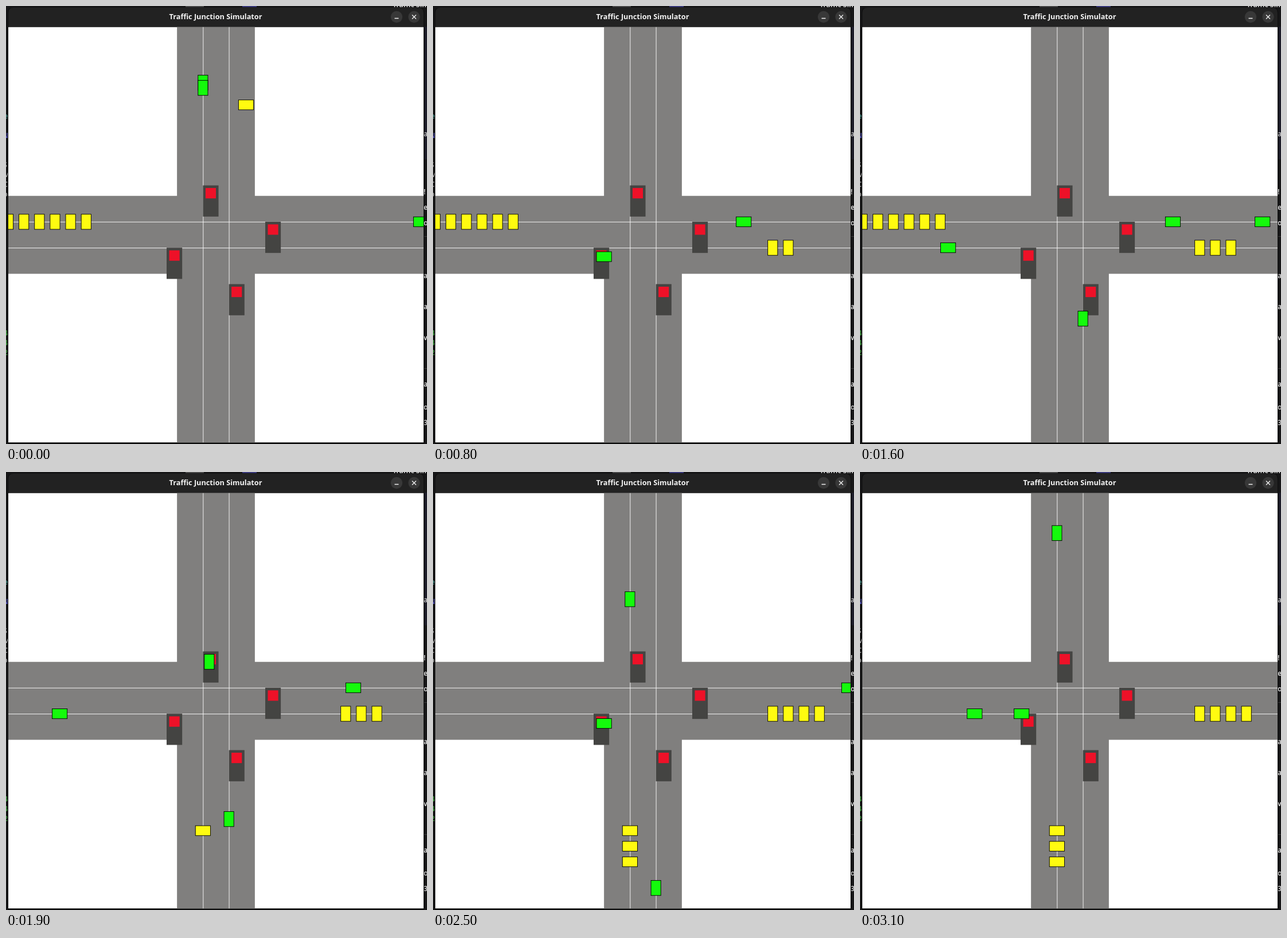
An HTML page that plays this animation: 734 px wide and 763 px high, repeating every 3.2 s.

```html
<!DOCTYPE html>
<html lang="en">
<head>
<meta charset="utf-8">
<title>Traffic Junction Simulator</title>
<style>
  html, body { margin: 0; width: 100%; height: 100%; overflow: hidden; background: #161616; }
  svg { display: block; width: 734px; height: 763px; }
  text { font-family: "Open Sans", "Noto Sans", sans-serif; }
</style>
</head>
<body>
<svg viewBox="0 0 734 763" width="734" height="763">
  <defs><clipPath id="view"><rect width="800" height="800"/></clipPath></defs>
  <rect width="734" height="763" fill="#161617"/>
  <rect x="729.500" y="36" width="5" height="231" fill="#1c1c28"/>
  <path d="M313 1h32" stroke="#4a4a4a" stroke-width="2"/>
  <path d="M412 1h25" stroke="#39397a" stroke-width="2"/>
  <path d="M729 401.500h5M729 631.500h5" stroke="#3c3c3c"/>
  <text x="674" y="2" font-size="12.500" font-weight="600" fill="#eee">Traffic Sim</text>
  <g id="edges"></g>
  <path d="M3 763V12Q3 3 12 3H720Q729 3 729 12V763Z" fill="#0d0d0d"/>
  <path d="M4 36V12Q4 3 13 3H719Q728 3 728 12V36Z" fill="#222"/>
  <text x="365.500" y="23.300" font-size="12.700" font-weight="700" fill="#f4f4f4" text-anchor="middle">Traffic Junction Simulator</text>
  <g fill="#383838"><circle cx="681" cy="19" r="10.200"/><circle cx="711.500" cy="19" r="10.200"/></g>
  <path d="M677.500 21.500h7M708 15.500l7 7m0-7l-7 7" stroke="#f0f0f0" stroke-width="1.300" fill="none"/>
  <g transform="translate(4 36.500) scale(.905)" clip-path="url(#view)">
    <rect width="800" height="800" fill="#fff"/>
    <path d="M325 0H475V800H325ZM0 325H800V475H0Z" fill="#807f7e"/>
    <path d="M375.500 0V800M425.500 0V800M0 375.500H800M0 425.500H800" stroke="#fff"/>
    <g id="lights"></g>
    <g id="cars" stroke="#000"></g>
  </g>
</svg>
<script>
const LOOP = 3200, STEP = 100;
const SPEED = 0.221;            // scene units per ms
const LONG = 30, SHORT = 20;    // car sides
const YELLOW = '#fffb10', GREEN = '#14fa0c', RED = '#ee1128';
const get = id => document.getElementById(id);

const rect = (x, y, w, h, fill) =>
  `<rect x="${x}" y="${y}" width="${w}" height="${h}" fill="${fill}"/>`;
const car = (x, y, upright, fill) => {
  const [w, h] = upright ? [SHORT, LONG] : [LONG, SHORT];
  return rect(x + 0.5, y + 0.5, w - 1, h - 1, fill);
};

// Slivers of text from the windows behind
const column = (x, y, pitch, chars, fill) => [...chars].map((c, i) =>
  `<text x="${x}" y="${y + i * pitch}" font-size="12.500" font-weight="600" fill="${fill}">${c}</text>`).join('');
get('edges').innerHTML =
  column(-4, 196, 17, 'e', '#4b9a90') +
  column(-6, 230, 17, 'N', '#5a5ac0') +
  column(-5, 281, 17, 'SMCo', '#aaa') +
  column(-4, 574, 17, '442', '#3f9a3f') +
  column(728, 227, 27, 'a', '#ccc') +
  column(728, 328, 27, '!eo', '#eee') +
  column(728, 474, 27, 'a a v  a', '#eee') +
  column(728, 703, 27, 'o3', '#ddd');

// One signal per side, each a quarter turn around the centre
const signal = (x, y) => rect(x, y, 30, 60, '#444442') + rect(x + 5, y + 5, 20, 20, RED);
get('lights').innerHTML =
  signal(375, 305) + signal(495, 375) + signal(305, 425) + signal(425, 495);

// Exits: a car is released at (x, y), shifts to its lane, then drives off
const exits = [
  { x: 380, y: 310, lane: 365, upright: true, sign: -1, born: [-1053, -1008, 1887] },
  { x: 430, y: 460, lane: 415, upright: true, sign: 1, born: [1141] },
  { x: 310, y: 435, lane: 415, upright: false, sign: -1, born: [787, 2494, 2903] },
  { x: 500, y: 380, lane: 365, upright: false, sign: 1, born: [-1335, 374, 1155] }
];

// Queues: one car joins every gap ms, up to max, until the queue is released
const queues = [
  { x: 140, y: 360, dx: -30, dy: 0, first: -600, gap: 100, max: 6, end: 1900 },
  { x: 640, y: 410, dx: 30, dy: 0, first: 100, gap: 650, max: 4, end: LOOP },
  { x: 360, y: 640, dx: 0, dy: 30, first: 200, gap: 100, max: 4, end: 800 },
  { x: 360, y: 640, dx: 0, dy: 30, first: 1900, gap: 200, max: 3, end: LOOP },
  { x: 443, y: 140, dx: 0, dy: -30, first: 0, gap: 100, max: 1, end: 400 }
];

function drive({ x, y, lane, upright, sign }, age) {
  if (age < 0) return '';
  const way = SPEED * age;
  const shift = (upright ? x : y) - lane;
  const side = lane + Math.max(0, shift - way);
  const along = sign * Math.max(0, way - shift);
  return upright ? car(side, y + along, true, GREEN) : car(x + along, side, false, GREEN);
}

function wait({ x, y, dx, dy, first, gap, max, end }, t) {
  if (t < first || t >= end) return '';
  const count = Math.min(max, 1 + Math.floor((t - first) / gap));
  return Array.from({ length: count }, (_, i) =>
    car(x + dx * i, y + dy * i, dx !== 0, YELLOW)).join('');
}

function render(t) {
  const now = t - 0.04 * Math.max(0, t - 2500);   // traffic slows slightly at the end
  get('cars').innerHTML =
    queues.map(q => wait(q, t)).join('') +
    exits.map(e => e.born.map(b => drive(e, now - b)).join('')).join('');
}

const start = performance.now();
let last = -1;
function tick() {
  const elapsed = (performance.now() - start) % LOOP;
  const t = Math.floor(elapsed / STEP) * STEP;
  if (t !== last) render(last = t);
  requestAnimationFrame(tick);
}
tick();
</script>
</body>
</html>
```
